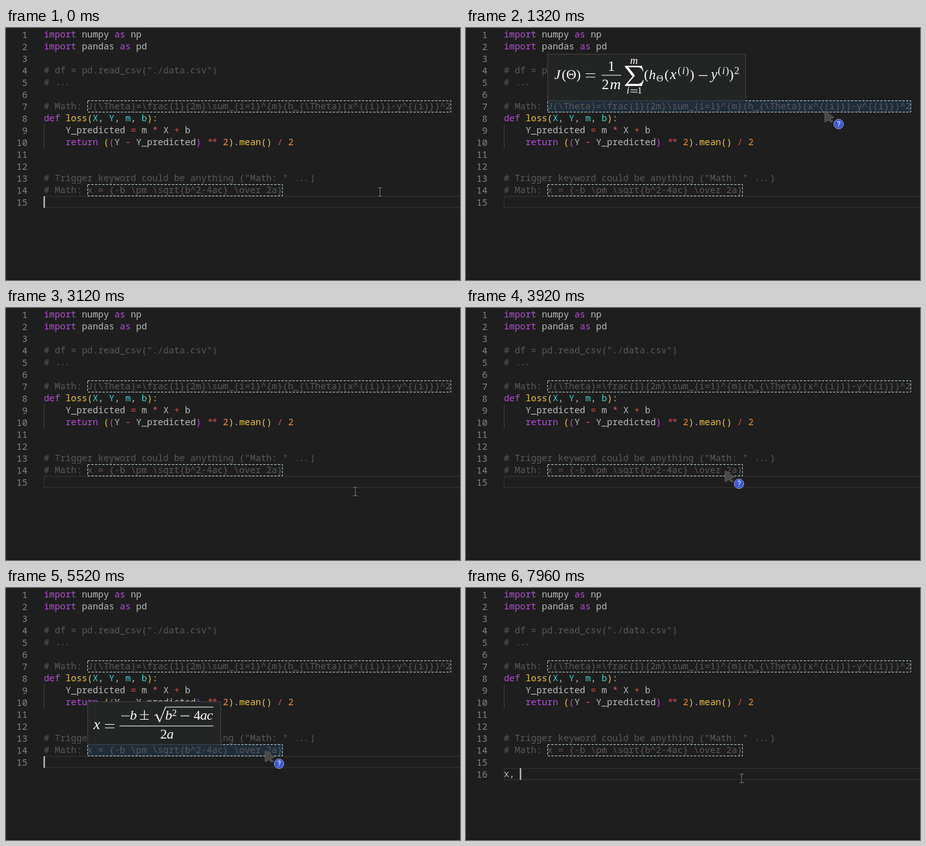
An HTML page that plays this animation: 720x400 px, repeating every 8000 ms.

```html
<!DOCTYPE html>
<html lang="en">
<head>
<meta charset="utf-8">
<title>Math preview in a code editor</title>
<style>
  html, body { margin: 0; width: 100%; height: 100%; overflow: hidden; background: #1e1e1e; }
  svg { display: block; width: 100vw; height: 100vh; }
  text { white-space: pre; }
  .code { font: 14.35px "Noto Sans Mono", "DejaVu Sans Mono", monospace; }
  .math { font-family: "Liberation Serif", "Noto Serif", serif; fill: #fff; text-anchor: middle; }
</style>
</head>
<body>
<svg id="stage" viewBox="0 0 720 400"></svg>
<script>
const LOOP = 8000, CH = 8.61, ROW = 19, LEFT = 60;
const C = {
  key: '#b54fd8', txt: '#bcbcbc', dim: '#5a5a5a', fn: '#f2c63f',
  arg: '#40d0d0', op: '#e0504c', num: '#f0943e', line: '#858585'
};
const stage = document.getElementById('stage');

function add(parent, tag, attrs, text) {
  const el = document.createElementNS('http://www.w3.org/2000/svg', tag);
  for (const k in attrs) el.setAttribute(k, attrs[k]);
  if (text !== undefined) el.textContent = text;
  parent.appendChild(el);
  return el;
}
const rect = (p, x, y, width, height, attrs) => add(p, 'rect', { x, y, width, height, ...attrs });
const path = (p, d, attrs) => add(p, 'path', { d, ...attrs });
const show = (el, on) => el.setAttribute('visibility', on ? 'visible' : 'hidden');
const rowTop = row => 1 + (row - 1) * ROW;
const base = row => rowTop(row) + 14.2;

// tokens: "colour:text" pairs laid out on the character grid
function code(row, col, ...tokens) {
  for (const token of tokens) {
    const cut = token.indexOf(':'), text = token.slice(cut + 1);
    const tight = text === '**' || text === '...';
    add(stage, 'text', {
      class: 'code', x: LEFT + col * CH + (tight ? 1.4 : 0), y: base(row),
      fill: C[token.slice(0, cut)], 'letter-spacing': tight ? -1.5 : 0
    }, text);
    col += text.length;
  }
}

function lineNo(n) {
  return add(stage, 'text', {
    class: 'code', x: 34, y: base(n) + 0.7, fill: C.line, 'text-anchor': 'end'
  }, n);
}

// Static editor
rect(stage, 0, 0, 720, 400, { fill: '#1e1e1e' });
rect(stage, 0, 398, 720, 2, { fill: '#181818' });
const current = rect(stage, 60.5, 0, 670, 18, { fill: 'none', stroke: '#303030', 'stroke-width': 1.4 });

const formulas = [
  { row: 7, text: 'J(\\Theta)=\\frac{1}{2m}\\sum_{i=1}^{m}(h_{\\Theta}(x^{(i)})-y^{(i)})^2', from: 1260, to: 2660 },
  { row: 14, text: 'x = {-b \\pm \\sqrt{b^2-4ac} \\over 2a}', from: 4260, to: 6020 }
];
for (const f of formulas) {
  f.x = 129;
  f.y = rowTop(f.row);
  f.w = f.text.length * CH;
  f.glow = rect(stage, f.x, f.y, f.w, ROW, { fill: '#264f78', opacity: 0.3 });
}

for (let n = 1; n <= 15; n++) lineNo(n);
const newNo = lineNo(16);

code(1, 0, 'key:import', 'txt: numpy ', 'key:as', 'txt: np');
code(2, 0, 'key:import', 'txt: pandas ', 'key:as', 'txt: pd');
code(4, 0, 'dim:# df = pd.read_csv("./data.csv")');
code(5, 0, 'dim:# ', 'dim:...');
code(8, 0, 'key:def ', 'fn:loss(', 'arg:X', 'txt:, ', 'arg:Y', 'txt:, ', 'arg:m', 'txt:, ', 'arg:b', 'fn:)', 'txt::');
code(9, 4, 'txt:Y_predicted ', 'op:=', 'txt: m ', 'op:*', 'txt: X ', 'op:+', 'txt: b');
code(10, 4, 'key:return ', 'fn:(', 'key:(', 'txt:Y ', 'op:-', 'txt: Y_predicted', 'key:)', 'txt: ', 'op:**',
  'num: 2', 'fn:)', 'txt:.', 'fn:mean()', 'op: /', 'num: 2');
code(13, 0, 'dim:# Trigger keyword could be anything ("Math: " ', 'dim:...', 'dim:)');
for (const f of formulas) {
  code(f.row, 0, 'dim:# Math: ' + f.text);
  rect(stage, f.x + 0.5, f.y + 0.5, f.w - 1, ROW - 1, {
    fill: 'none', stroke: '#b9d3d3', 'stroke-dasharray': '3.6 2.2'
  });
}
rect(stage, 60, 153, 1, 38, { fill: '#414141' });

const typed = add(stage, 'text', { class: 'code', x: LEFT, y: base(16), fill: C.txt });
const caret = rect(stage, 0, 0, 2, 18.5, { fill: '#d0d0d0' });

// Preview popups
function popup(x, y, w, h) {
  const g = add(stage, 'g', {});
  rect(g, x + 0.5, y + 0.5, w - 1, h - 1, { fill: '#232525', stroke: '#434545' });
  return g;
}
function sign(g, text, x, y, size = 22, italic = false) {
  add(g, 'text', { class: 'math', x, y, 'font-size': size, 'font-style': italic ? 'italic' : 'normal' }, text);
}
const it = (g, text, x, y, size) => sign(g, text, x, y, size, true);
const stroke = (g, d, w = 1.2) => path(g, d, { fill: 'none', stroke: '#fff', 'stroke-width': w });

const cost = popup(129, 41, 315, 75);
it(cost, 'J', 145, 81);
sign(cost, '(', 155.5, 81);
sign(cost, 'Θ', 167, 81);
sign(cost, ')', 178.5, 81);
stroke(cost, 'M190 72.5h15M190 78h15M215 75h31');
sign(cost, '1', 230.5, 68, 23);
sign(cost, '2', 221, 97, 23);
it(cost, 'm', 237, 97, 24);
path(cost, 'M252 60H279L281.5 68.5H280.3Q279 62.5 272 62.3H257.5L268 75.5L256.5 88.8H272Q279 88.6 280.7 82.5H282L279 92H252V91L264 77L252 61.5Z', { fill: '#fff' });
it(cost, 'm', 266.5, 56.5, 17);
it(cost, 'i', 257, 104, 16);
stroke(cost, 'M261 98.2h11M261 101.8h11', 1);
sign(cost, '1', 275.5, 104, 15);
sign(cost, '(', 286, 81);
it(cost, 'h', 295.5, 81);
sign(cost, 'Θ', 307.5, 85, 15);
sign(cost, '(', 318.5, 81);
it(cost, 'x', 328.5, 81, 23);
sign(cost, '(', 338.5, 73, 16);
it(cost, 'i', 345, 73, 16);
sign(cost, ')', 351, 73, 16);
sign(cost, ')', 358.5, 81);
stroke(cost, 'M369 75.5h14');
it(cost, 'y', 393.5, 81, 23);
sign(cost, '(', 402, 73, 16);
it(cost, 'i', 408.5, 73, 16);
sign(cost, ')', 414.5, 73, 16);
sign(cost, ')', 421, 81);
sign(cost, '2', 429.5, 73, 16);

const roots = popup(129, 180, 212, 69);
it(roots, 'x', 144, 224, 24);
stroke(roots, 'M157 216.5h15M157 222h15M180 219h149M183 203h13');
it(roots, 'b', 202, 208.5);
stroke(roots, 'M212.5 201h14M219.5 194v14M212.5 208.5h14');
stroke(roots, 'M235 203l3.5-2.5', 1);
stroke(roots, 'M238.5 200.5l5 11.5', 2);
stroke(roots, 'M243.5 213L253 189H329', 1.2);
it(roots, 'b', 258, 208.5);
sign(roots, '2', 267, 202.5, 15);
stroke(roots, 'M277 203h14');
sign(roots, '4', 303, 208.5);
it(roots, 'a', 313.5, 208.5);
it(roots, 'c', 323.5, 208.5);
sign(roots, '2', 250, 239);
it(roots, 'a', 260.5, 239);
formulas[0].popup = cost;
formulas[1].popup = roots;

// Mouse pointers, both with the hot spot at 0,0
const beam = add(stage, 'g', {});
const beamPath = 'M-3.5 -6.5H3.5M0 -6.5V7M-3.5 7H3.5';
path(beam, beamPath, { fill: 'none', stroke: '#111', 'stroke-width': 3.4 });
path(beam, beamPath, { fill: 'none', stroke: '#6a6a6a', 'stroke-width': 1.5 });

const help = add(stage, 'g', {});
path(help, 'M0 0L14.5 10.5L8 13L13 17L10 18.5L6 14.5L0 18Z', {
  fill: '#484848', stroke: '#606060', 'stroke-linejoin': 'round'
});
add(help, 'circle', { cx: 22, cy: 21, r: 7.6, fill: '#3d59cf', stroke: '#a9b5e6', 'stroke-width': 0.8 });
add(help, 'text', {
  x: 22, y: 25.2, fill: '#fff', 'text-anchor': 'middle',
  'font-family': 'Roboto, "Open Sans", sans-serif', 'font-size': 12
}, '?');

// Motion: start, end, target x, target y
const moves = [
  [0, 500, 569, 137], [560, 700, 569, 131.5], [2560, 3060, 554, 291],
  [3420, 3900, 411, 258], [5920, 6480, 437, 302]
];
const blinks = [[0, 320], [1720, 3120], [4520, 5920], [6440, LOOP]];
const keys = [[7080, 'x'], [7620, ','], [7880, ' ']];
const NEWLINE = 6680;

const within = (t, a, b) => t >= a && t < b;
const ease = k => k * k * (3 - 2 * k);

function pointer(t) {
  let x = 593, y = 260;
  for (const [a, b, tx, ty] of moves) {
    const k = ease(Math.min(1, Math.max(0, (t - a) / (b - a))));
    x += (tx - x) * k;
    y += (ty - y) * k;
  }
  return [x, y];
}

function draw(t) {
  const [x, y] = pointer(t);
  const over = formulas.some(f => within(x, f.x, f.x + f.w) && within(y, f.y, f.y + ROW));
  show(beam, !over);
  show(help, over);
  for (const p of [beam, help]) p.setAttribute('transform', `translate(${x} ${y})`);

  for (const f of formulas) {
    const open = within(t, f.from, f.to);
    show(f.popup, open);
    show(f.glow, open);
  }

  const row = t < NEWLINE ? 15 : 16;
  const text = keys.filter(k => t >= k[0]).map(k => k[1]).join('');
  show(newNo, row === 16);
  typed.textContent = text;
  current.setAttribute('y', rowTop(row) + 0.3);
  caret.setAttribute('x', LEFT + text.length * CH - 0.4);
  caret.setAttribute('y', rowTop(row));
  show(caret, blinks.some(b => within(t, b[0], b[1])));
}

const start = performance.now();
function tick() {
  draw((performance.now() - start) % LOOP);
  requestAnimationFrame(tick);
}
tick();
</script>
</body>
</html>
```
